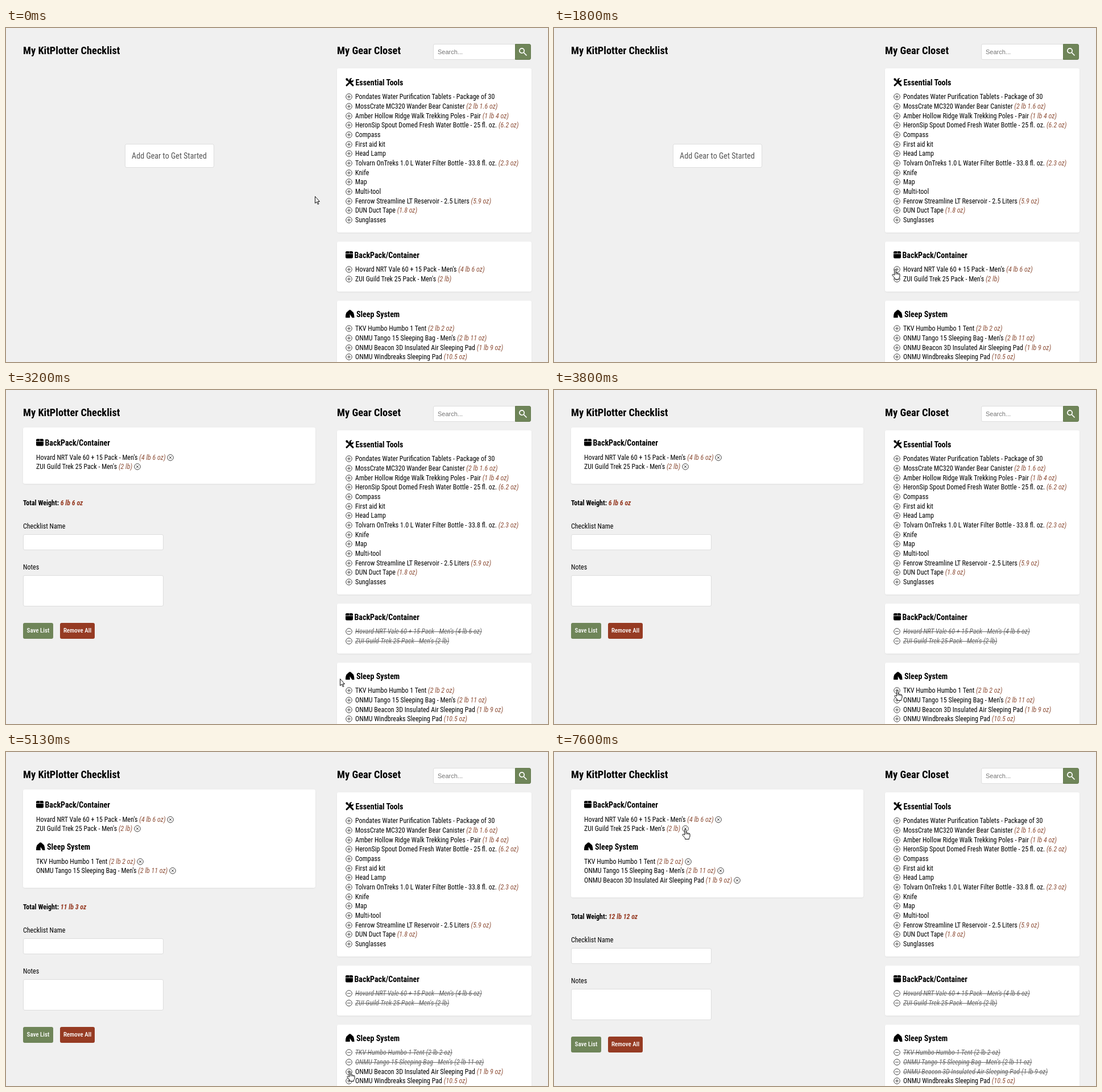
Animation of 953 by 588 pixels, one loop 8 s. Source, as an HTML page:

```html
<!DOCTYPE html>
<html lang="en">
<head>
<meta charset="utf-8">
<title>Gear checklist</title>
<style>
html, body { margin: 0; width: 100%; height: 100%; overflow: hidden; background: #f0f0f0; }
body { position: relative; color: #000; font: 12px/20px "Roboto Condensed", Roboto, sans-serif; font-stretch: 75%; }
div, svg.at { position: absolute; white-space: pre; box-sizing: border-box; }
i { color: #8e5039; }
b { font-weight: 600; }
h1, h2 { margin: 0; font-size: 18.4px; font-weight: 600; line-height: 20px; }
h2 { font-size: 14px; }
s { color: #666; font-style: italic; }
.card { background: #fff; border-radius: 3px; box-shadow: 0 1px 3px #0001; }
.field { background: #fff; border: 1px solid #ddd; border-radius: 3px; }
.btn { color: #fff; border-radius: 3px; text-align: center; font-size: 11px; font-weight: 500; line-height: 28px; }
.green { background: #6f8559; }
.find { border: 1px solid #647a4e; border-radius: 0 3px 3px 0; }
.red { background: #963b23; }
.big { color: #555; font-size: 14.1px; line-height: 40px; text-align: center; }
.hint { color: #757575; font: 11px/20px Arial, "Liberation Sans", sans-serif; }
.total i { color: #963b23; }
.ring { fill: none; stroke: #333; stroke-width: .9; }
.inline { position: relative; top: 2px; }
</style>
</head>
<body>
<div id="page"></div>
<svg id="cursor" class="at" width="20" height="24" fill="#fff" stroke="#111" stroke-linejoin="round"></svg>
<script>
const FPS = 15, FRAMES = 120, ROW = 16.69;
// icon, name, title y, card top, card height, title gap, items
const closet = [
  ["tools", "Essential Tools", 95.5, 71, 289, 17.5, [
    ["Pondates Water Purification Tablets - Package of 30"],
    ["MossCrate MC320 Wander Bear Canister", "2 lb 1.6 oz"],
    ["Amber Hollow Ridge Walk Trekking Poles - Pair", "1 lb 4 oz"],
    ["HeronSip Spout Domed Fresh Water Bottle - 25 fl. oz.", "6.2 oz"],
    ["Compass"], ["First aid kit"], ["Head Lamp"],
    ["Tolvarn OnTreks 1.0 L Water Filter Bottle - 33.8 fl. oz.", "2.3 oz"],
    ["Knife"], ["Map"], ["Multi-tool"],
    ["Fenrow Streamline LT Reservoir - 2.5 Liters", "5.9 oz"],
    ["DUN Duct Tape", "1.8 oz"], ["Sunglasses"]]],
  ["box", "BackPack/Container", 399.5, 376, 88, 15.5, [
    ["Hovard NRT Vale 60 + 15 Pack - Men's", "4 lb 6 oz"],
    ["ZUI Guild Trek 25 Pack - Men's", "2 lb"]]],
  ["tent", "Sleep System", 503.5, 480, 140, 19, [
    ["TKV Humbo Humbo 1 Tent", "2 lb 2 oz"],
    ["ONMU Tango 15 Sleeping Bag - Men's", "2 lb 11 oz"],
    ["ONMU Beacon 3D Insulated Air Sleeping Pad", "1 lb 9 oz"],
    ["ONMU Windbreaks Sleeping Pad", "10.5 oz"]]]];
const totals = ["", "4 lb 6 oz", "6 lb 6 oz", "8 lb 8 oz", "11 lb 3 oz", "12 lb 12 oz"];
const clicks = [31, 40, 60, 72, 80];
// frame, x, y of the pointer's hot spot
const path = [[0, 543, 296], [8, 543, 296], [10, 540, 304], [12, 540, 304], [16, 527, 345], [20, 551, 419],
  [25, 595, 422], [27, 600, 425], [31, 600, 425], [36, 606, 443], [44, 606, 443], [48, 587, 508], [49, 584, 516],
  [51, 592, 529], [53, 592, 529], [57, 604, 529], [59, 604, 529], [62, 605, 554], [66, 605, 554], [67, 605, 549],
  [72, 605, 549], [77, 605, 562], [86, 605, 562], [91, 473, 438], [93, 473, 438], [96, 384, 305],
  [106, 313, 154], [114, 231, 136], [120, 231, 136]];
const handTimes = [[26, 45], [55, 87], [112, 120]];

const icons = {
  tools: `<path d="M2 2 6 6" stroke="#000" stroke-width="2"/><path d="M9.500 9.500 13 13M2 13 9 6" stroke="#000" stroke-width="3" stroke-linecap="round"/><path d="M0 2 2 0 5 2V4L10 8 8 10 4 5H2zM13.500 3 11.500 5 9.600 4.500 9.200 2.700 11.500.5C8.500-.5 6 2 6.500 5L9 8C12 8.500 15.300 6 13.500 3z"/>`,
  box: `<path d="M0 5.200V3Q0 1 2 1H6.200V5.200zM6.800 5.200V1H11Q13 1 13 3V5.200zM0 6H13V11.500Q13 13.500 11 13.500H2Q0 13.500 0 11.500z"/>`,
  tent: `<path d="M6.500.6Q7.700-.3 9 .6L14 5Q15.500 9 15.500 14H11.500L7.700 8V14H.5Q0 14 0 13Q0 8 1.500 5z"/>`
};
const arrow = `<path d="M3.500 2.500V14.500L6.300 12 8.300 16.500 10 15.700 8.100 11.500H11.500z"/>`;
const hand = `<path d="M6.500 12V3.500Q6.500 2 7.700 2T9 3.500V8Q11 7 11.500 8.700 13.300 8 13.800 9.500 16 9 16 11V14Q16 16 14.500 17.500V19.500H7.500V17.500L3 12.500Q2.500 10.500 4.500 10.700z"/><path d="M9 8V11M11.500 8.700V11M13.800 9.500V11.500" fill="none"/>`;

const at = (x, y, html, tag = "div", cls = "") => `<div class="${cls}" style="left:${x}px;top:${y - 10}px"><${tag}>${html}</${tag}></div>`;
const box = (cls, x, y, w, h, html = "") => `<div class="${cls}" style="left:${x}px;top:${y}px;width:${w}px;height:${h}px">${html}</div>`;
const svg = (x, y, html) => `<svg class="at" style="left:${x}px;top:${y}px;overflow:visible" width="16" height="15">${html}</svg>`;
const ring = d => `<g class="ring"><circle cx="6" cy="6" r="5.300"/><path d="${d}"/></g>`;
const cross = `<svg class="inline" width="12" height="12">${ring("M3.700 3.700 8.300 8.300M8.300 3.700 3.700 8.300")}</svg>`;
const title = (x, y, icon, gap, text) => svg(x, y - 8, icons[icon]) + at(x + gap, y, text, "h2");
const label = ([name, weight], tag = "i") => name + (weight ? ` <${tag}>(${weight})</${tag}>` : "");

function closetHtml(count) {
  let html = at(582, 40, "My Gear Closet", "h1") + box("field", 751, 28, 145, 28) + at(759, 42, "Search...", "span", "hint") +
    box("green find", 895, 28, 28, 28) +
    svg(902, 35, `<g fill="none" stroke="#fff" stroke-width="1.700"><circle cx="5" cy="5" r="4.200"/><path d="M8 8 13.500 13.500"/></g>`);
  closet.forEach(([icon, name, y, top, h, gap, items], group) => {
    html += box("card", 582, top, 342, h) + title(597, y, icon, gap, name);
    items.forEach((item, i) => {
      const used = group && i + (group - 1) * 2 < count, rowY = y + 25.7 + i * ROW;
      html += svg(597, Math.round(rowY - 6), ring(used ? "M3 6H9" : "M3 6H9M6 3V9"));
      html += at(614, rowY, label(item, used ? "span" : "i"), used ? "s" : "span");
    });
  });
  return html;
}

function checklistHtml(count) {
  const head = at(30, 40, "My KitPlotter Checklist", "h1");
  if (!count) return head + box("field big", 208.500, 204, 157, 42, "Add Gear to Get Started");
  let y = 93, rows = "";
  for (const [group, start] of [[1, 0], [2, 2]]) {
    if (count <= start) break;
    const [icon, name, , , , gap, items] = closet[group];
    if (start) y += 31.5;
    rows += title(53, y, icon, gap, name);
    y += 25.8;
    items.slice(0, Math.min(count - start, group + 1)).forEach((item, i) => {
      if (i) y += ROW;
      rows += at(53, y, label(item) + " " + cross);
    });
  }
  const end = Math.round(y + 30);
  return head + box("card", 30, 66, 514, end - 66) + rows +
    at(30, end + 33.5, `Total Weight: <i>${totals[count]}</i>`, "b", "total") +
    at(30, end + 74.5, "Checklist Name") + box("field", 30, end + 89, 247, 28) +
    at(30, end + 146.5, "Notes") + box("field", 30, end + 161, 247, 55) +
    box("btn green", 30, end + 245, 53, 28, "Save List") + box("btn red", 95, end + 245, 61, 28, "Remove All");
}

const page = document.getElementById("page"), cursor = document.getElementById("cursor");
let shown = -1, pose = "";
function draw(now) {
  const frame = Math.floor(now / 1000 * FPS + .1) % FRAMES;
  const count = clicks.filter(f => frame >= f).length;
  if (count !== shown) page.innerHTML = checklistHtml(shown = count) + closetHtml(count);
  const k = path.findIndex(p => p[0] > frame), [f0, x0, y0] = path[k - 1], [f1, x1, y1] = path[k];
  const u = (frame - f0) / (f1 - f0);
  const isHand = handTimes.some(([a, b]) => frame >= a && frame < b), next = isHand ? hand : arrow;
  if (next !== pose) cursor.innerHTML = pose = next;
  cursor.style.left = Math.round(x0 + (x1 - x0) * u) - (isHand ? 8 : 3) + "px";
  cursor.style.top = Math.round(y0 + (y1 - y0) * u) - 2 + "px";
  requestAnimationFrame(draw);
}
draw(0);
</script>
</body>
</html>
```
